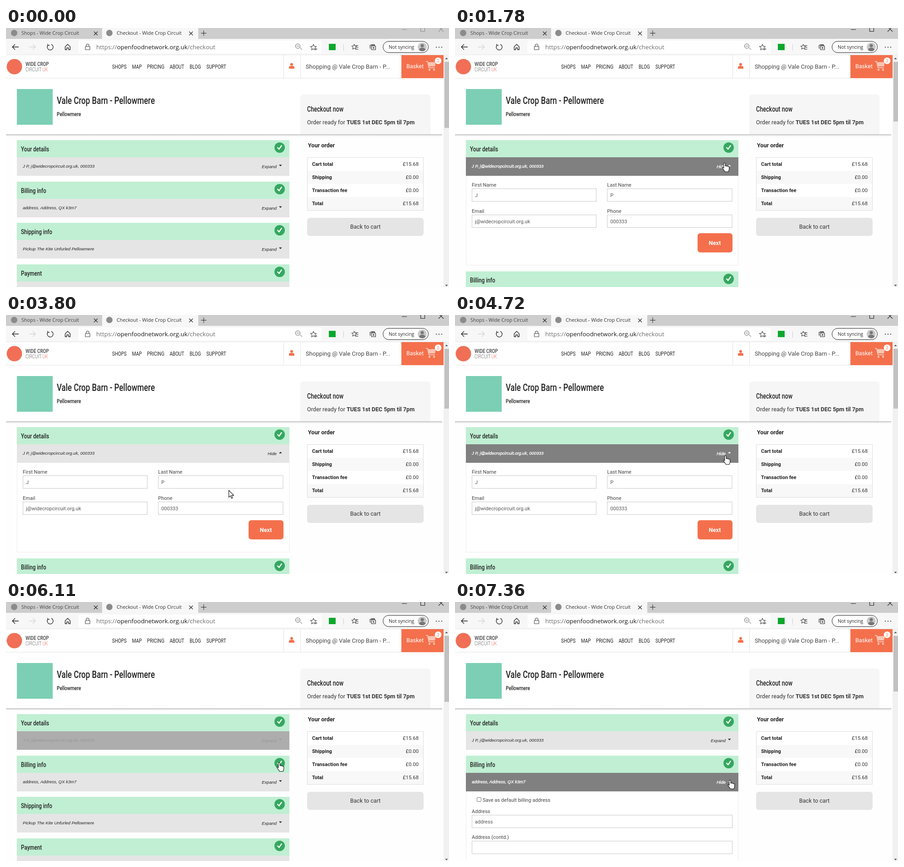
Animation of 977 by 573 pixels, one loop 8000 ms. Source, as an HTML page:

```html
<!DOCTYPE html>
<html lang="en">
<head>
<meta charset="utf-8">
<title>Checkout</title>
<style>
html, body { margin: 0; width: 100%; height: 100%; overflow: hidden; background: #fefefe; }
svg { display: block; }
text { font-family: Roboto, sans-serif; white-space: pre; }
.ui { font-family: "Open Sans", sans-serif; }
.note { font-family: "Liberation Sans", Arial, sans-serif; font-style: italic; }
.b { font-weight: 700; }
.line { fill: none; stroke: #222; stroke-width: 1.3; stroke-linejoin: round; }
</style>
</head>
<body>
<svg id="stage" width="977" height="573" viewBox="0 0 977 573"></svg>
<script>
const LOOP = 8000, FADE = 280;
const CORAL = '#f4704c', MINT = '#c0efd3', INK = '#222';

const rect = (x, y, w, h, fill, more = '') =>
  `<rect x="${x}" y="${y}" width="${w}" height="${h}" fill="${fill}" ${more}/>`;
const circle = (x, y, r, fill, more = '') =>
  `<circle cx="${x}" cy="${y}" r="${r}" fill="${fill}" ${more}/>`;
const text = (x, y, size, s, fill = INK, more = '') =>
  `<text x="${x}" y="${y}" font-size="${size}" fill="${fill}" ${more}>${s}</text>`;
const narrow = (x, y, size, s, fill = INK, more = 'font-weight="500"') =>
  `<text transform="translate(${x} ${y}) scale(.76 1)" font-size="${size}" fill="${fill}" ${more}>${s}</text>`;
const line = (d, more = '') => `<path class="line" d="${d}" ${more}/>`;
const ui = 'class="ui"', bold = 'class="b"', mid = 'text-anchor="middle"', end = 'text-anchor="end"';

function star(cx, cy, r) {
  let d = '';
  for (let i = 0; i < 10; i++) {
    const a = i * Math.PI / 5, q = i % 2 ? r * .45 : r;
    d += `${i ? 'L' : 'M'}${(cx + q * Math.sin(a)).toFixed(1)} ${(cy - q * Math.cos(a)).toFixed(1)}`;
  }
  return line(d + 'Z', 'style="stroke-width:1"');
}

function browser() {
  const cross = x => line(`M${x - 4} 8l8 8m0 -8l-8 8`, 'style="stroke-width:1.1"');
  return rect(0, 0, 977, 25, '#cdcdcd') + rect(212, 0, 212, 26, '#f7f7f7') +
    rect(0, 24, 977, 35, '#f7f7f7') +
    circle(18, 11, 7, '#8b8b8b') + circle(228, 11, 7, '#8b8b8b') +
    text(34, 15, 10.8, 'Shops - Wide Crop Circuit', '#444', ui) +
    text(244, 15, 10.8, 'Checkout - Wide Crop Circuit', '#333', ui) +
    cross(198) + cross(408) + line('M430 11.5h12m-6 -6v12', 'style="stroke-width:1"') +
    `<path id="buttons" fill="none" stroke-width="1.1" d="M873 3.5h11M914.500 -2v9.500h9V-2M954 8l11 -11M965 8l-11 -11"/>` +
    line('M28 42H14m6 -6l-6 6l6 6') +
    line('M51 42h14m-6 -6l6 6l-6 6', 'style="stroke:#d5d5d5"') +
    line('M93 37.500a6.500 6.500 0 1 0 7 -1.300M91.500 35.500l1.200 3.200l3.600 -.6') +
    line('M130.500 41.500l5.500 -5.500l5.500 5.500V48h-3.500v-4h-4v4h-3.500z') +
    rect(160, 28, 536, 28, '#fff', 'rx="4"') +
    line('M175 41h10v7h-10zM177 41v-2.500a3 3 0 0 1 6 0V41', 'style="stroke:#444;stroke-width:1.1"') +
    `<text class="ui" x="199" y="47" font-size="13.4" fill="#6b6b6b">https://<tspan fill="#1a1a1a">openfoodnetwork.org.uk</tspan>/checkout</text>` +
    line('M648.500 43.500l4.500 4.500M641 40h5M648.500 40a5 5 0 1 1 -10 0a5 5 0 0 1 10 0z', 'style="stroke:#555;stroke-width:1"') +
    star(678, 43, 7) + line('M681.500 46.500h5m-2.500 -2.500v5', 'style="stroke:#555;stroke-width:1"') +
    rect(712, 35, 15, 14, '#0ca82c') + rect(744, 36, 1, 14, '#d0d0d0') +
    star(768, 42, 6) + line('M771 39h6M772 43h5M771 47h6', 'style="stroke-width:1.1"') +
    line('M806 39v-2h7v2M804 45h-1v-7h10v1M806 40h9v8h-9zM810.500 42v4m-2 -2h4', 'style="stroke-width:1.1"') +
    rect(831.5, 29.5, 100, 25, '#fff', 'rx="12.5" stroke="#222"') +
    text(844, 46, 10.3, 'Not syncing', INK, ui) +
    circle(918, 42, 10, '#c9c9c9') + circle(918, 39, 3.6, '#777') +
    `<path fill="#777" d="M911 48.500a7 5 0 0 1 14 0a9.600 9.600 0 0 1 -14 0z"/>` +
    [949, 955, 961].map(x => circle(x, 42.5, 1.1, INK)).join('');
}

function siteHeader() {
  const nav = [[234, 'SHOPS'], [278, 'MAP'], [311, 'PRICING'], [361, 'ABOUT'], [405, 'BLOG'], [442, 'SUPPORT']];
  return rect(0, 59, 965, 176, '#fff') + rect(0, 59, 977, 1, '#e4e4e4') + rect(0, 110.5, 872, 1, '#e6e6e6') +
    circle(18.5, 85.5, 17, '#f06f56') +
    narrow(43, 84, 13, 'WIDE CROP', '#444') +
    narrow(43, 96, 12.5, 'CIRCUIT <tspan fill="#f06f56">UK</tspan>', '#666', 'font-weight="300"') +
    nav.map(([x, s]) => narrow(x, 90, 13.1, s, INK, '')).join('') +
    rect(612, 60, 1, 51, '#e2e2e2') + rect(649, 60, 1, 51, '#e2e2e2') +
    circle(630, 80.5, 3.1, CORAL) +
    `<path fill="${CORAL}" d="M624 90v-2.500q0 -3.500 3.500 -3.500h5q3.500 0 3.500 3.500V90z"/>` +
    text(661, 90, 13.1, 'Shopping @ Vale Crop Barn - P...', '#444') +
    rect(872, 60, 93, 51, CORAL) + text(883, 89, 12.5, 'Basket', '#fff') +
    `<g fill="#fbc4b2"><path d="M926 73h4.500l.6 2.500H948l-2 9.500h-12.500l.4 2H946v2h-14l-3 -14h-3z"/>` +
    circle(934, 92.5, 2.2, '#fbc4b2') + circle(944, 92.5, 2.2, '#fbc4b2') + '</g>' +
    circle(953, 72.5, 7.3, '#fff') + text(953, 76, 9.5, '2', CORAL, mid) +
    rect(24, 135, 79, 79, '#7ccfb4') +
    narrow(112, 168, 22.3, 'Vale Crop Barn - Pellowmere') +
    narrow(112, 195, 13.3, 'Pellowmere') +
    `<path fill="#f6f6f6" d="M649 235v-80q0 -8 8 -8h271q8 0 8 8v80z"/>` +
    narrow(664, 185, 16.6, 'Checkout now') +
    text(664, 213, 12.65, 'Order ready for <tspan class="b">TUES 1st DEC 5pm til 7pm</tspan>', '#333') +
    rect(0, 235, 962, 5, 'url(#shade)');
}

function orderBox() {
  const items = [['Cart total', '15.68'], ['Shipping', '0.00'], ['Transaction fee', '0.00'], ['Total', '15.68']];
  return text(666, 264, 12.55, 'Your order', INK, bold) +
    rect(664.5, 286.5, 256, 117, '#fff', 'stroke="#dcdcdc"') +
    items.map(([name, sum], i) => (i % 2 ? rect(665, 287 + i * 29, 255, 29, '#f8f8f8') : '') +
      text(675, 305 + i * 29, 11.1, name, INK, bold) +
      text(910, 305 + i * 29, 11.3, '£' + sum, '#333', end)).join('') +
    rect(664, 420, 257, 40, '#e5e5e5', 'rx="6"') + text(792.5, 444, 12.6, 'Back to cart', '#333', mid);
}

function section(i, title, note) {
  const y = 248 + Math.round(i * 91.5);
  return `<g id="sec${i}">` + rect(24, y, 601, 38, MINT) +
    narrow(33, y + 24.5, 15.4, title) + circle(603.5, y + 16.5, 11.5, '#36a760') +
    `<path d="M598.500 ${y + 16}l3.700 4l6 -8.500" fill="none" stroke="#fff" stroke-width="2.3"/>` +
    `<g class="row">` + rect(24, y + 38, 601, 41, '#e5e5e5') +
    text(37, y + 60.5, 9.5, note, INK, 'class="note"') +
    text(564, y + 61.5, 9.7, 'Expand', INK, 'class="note more"') +
    text(577, y + 61.5, 9.7, 'Hide', INK, 'class="note less"') +
    `<path class="more" d="M602 ${y + 54.5}h6.500l-3.250 3.500z"/><path class="less" d="M602 ${y + 58}h6.500l-3.250 -3.500z"/></g></g>`;
}

const field = (x, y, w, label, value) => text(x, y - 4.5, 11.05, label, '#444') +
  rect(x + .5, y + .5, w - 1, 28, '#fff', 'stroke="#c8c8c8"') + text(x + 7, y + 18.5, 11.05, value, '#555');

function panels() {
  return `<g id="panel0">` + rect(24.5, 326.5, 600, 198, '#fff', 'stroke="#ececec"') +
    field(37, 355, 275, 'First Name', 'J') + field(335.5, 355, 276, 'Last Name', 'P') +
    field(37, 413, 275, 'Email', 'j@widecropcircuit.org.uk') + field(335.5, 413, 276, 'Phone', '000333') +
    rect(535, 454, 77, 42.5, CORAL, 'rx="6"') + text(573, 480, 12.6, 'Next', '#fff', mid + ' ' + bold) + '</g>' +
    `<g id="panel1">` + rect(24.5, 417.5, 600, 220, '#fff', 'stroke="#ececec"') +
    rect(48.5, 432.5, 9, 9, '#fff', 'rx="1.5" stroke="#777"') +
    text(61, 442, 11.05, 'Save as default billing address', '#444') +
    field(37, 471, 575, 'Address', 'address') + field(37, 528.5, 575, 'Address (contd.)', '') + '</g>';
}

const stage = document.getElementById('stage');
stage.innerHTML = `<defs><linearGradient id="shade" x2="0" y2="1">
  <stop stop-color="#b5b5b5"/><stop offset=".35" stop-color="#dedede"/><stop offset="1" stop-color="#fefefe"/></linearGradient></defs>` +
  rect(0, 0, 977, 573, '#fefefe') + panels() +
  section(0, 'Your details', 'J P, j@widecropcircuit.org.uk, 000333') +
  `<g id="rest">` + section(1, 'Billing info', 'address, Address, QX k3m7') + `<g id="tail">` +
  section(2, 'Shipping info', 'Pickup The Kite Unfurled Pellowmere') + section(3, 'Payment', '') + '</g></g>' +
  orderBox() + siteHeader() + browser() +
  rect(965, 59, 12, 514, '#f1f1f1') + rect(967, 75, 10, 146, '#c1c1c1', 'id="thumb"') +
  `<path fill="#555" d="M968.500 69h6l-3 -3.500zM968.500 568h6l-3 3.500z"/>` +
  circle(0, 0, 10.3, '#ff0', 'id="click" opacity=".47"') +
  `<g id="cursor" fill="#fff" stroke="#111" stroke-width="1.1" stroke-linejoin="round">
  <path id="hand" d="M-1.800 11V1.200a1.700 1.700 0 0 1 3.400 0V6.500a1.600 1.600 0 0 1 3 .6a1.600 1.600 0 0 1 3 .7a1.500 1.500 0 0 1 2.600 1.200V13c0 2-1.300 3.500-1.600 6H.6C.2 16.500-2.800 14.500-4.600 11.200c-1-2 1-2.800 2.800-.2z"/>
  <path id="arrow" d="M0 0V15.500L3.600 12L6 17.800L8.400 16.800L6 11.200H11Z"/></g>`;

const el = id => document.getElementById(id);
const show = (node, on) => node.setAttribute('display', on ? 'inline' : 'none');
const rows = document.querySelectorAll('.row');

// time, x, y of the pointer tip
const PATH = [
  [70, 808, 445], [320, 615, 325], [600, 594.5, 299], [3400, 594.5, 299], [3510, 570, 327],
  [3800, 491.5, 387.5], [4010, 472, 477], [4180, 478, 473], [4260, 478, 473], [4430, 575, 327],
  [4720, 596.5, 311.5], [5960, 596.5, 311.5], [6110, 602.5, 355.5], [6190, 604, 377], [6740, 606.5, 394.5]
];

function pointer(t) {
  const i = PATH.findIndex(p => p[0] > t);
  if (i < 0) return PATH[PATH.length - 1].slice(1);
  if (i === 0) return PATH[0].slice(1);
  const [t0, x0, y0] = PATH[i - 1], [t1, x1, y1] = PATH[i];
  const k = (t - t0) / (t1 - t0);
  return [x0 + (x1 - x0) * k, y0 + (y1 - y0) * k];
}

const ramp = (t, start) => Math.min(1, Math.max(0, (t - start) / FADE));
const within = (t, a, b) => t >= a && t < b;
const gray = (a, b, k) => { const v = Math.round(a + (b - a) * k); return `rgb(${v},${v},${v})`; };

function paintRow(row, hover, open) {
  const ink = gray(34, 255, hover);
  row.firstChild.setAttribute('fill', gray(229, 128, hover));
  row.querySelectorAll('text, path').forEach(n => n.setAttribute('fill', ink));
  row.querySelectorAll('.note').forEach(n => {
    n.setAttribute('stroke', ink);
    n.setAttribute('stroke-width', .35 * hover);
  });
  row.querySelectorAll('.more').forEach(n => show(n, !open));
  row.querySelectorAll('.less').forEach(n => show(n, open));
}

function draw(t) {
  const details = within(t, 1690, 5500), billing = t >= 7290;
  paintRow(rows[0], ramp(t, 320) - ramp(t, 3510) + ramp(t, 4430) - ramp(t, 5985), details);
  paintRow(rows[1], ramp(t, 6190), billing);
  show(el('panel0'), details);
  show(el('panel1'), billing);
  show(el('tail'), !billing);
  el('rest').setAttribute('transform', `translate(0 ${details ? 198.5 : 0})`);
  el('thumb').setAttribute('height', billing ? 123 : details ? 132 : 146);
  el('buttons').setAttribute('stroke', t < 1540 ? '#8c8c8c' : '#222');

  const [x, y] = pointer(t), hand = x < 625 && (y < 327 || t > 5500);
  const at = `translate(${x.toFixed(2)} ${y.toFixed(2)})`;
  el('cursor').setAttribute('transform', at);
  el('click').setAttribute('transform', at);
  show(el('cursor'), t >= 70);
  show(el('hand'), hand);
  show(el('arrow'), !hand);
  show(el('click'), within(t, 1540, 1690) || within(t, 5250, 5500) || within(t, 7060, 7290));
}

rows.forEach(row => paintRow(row, 0, false));
const begin = performance.now();
function tick() {
  draw((performance.now() - begin) % LOOP);
  requestAnimationFrame(tick);
}
tick();
</script>
</body>
</html>
```
